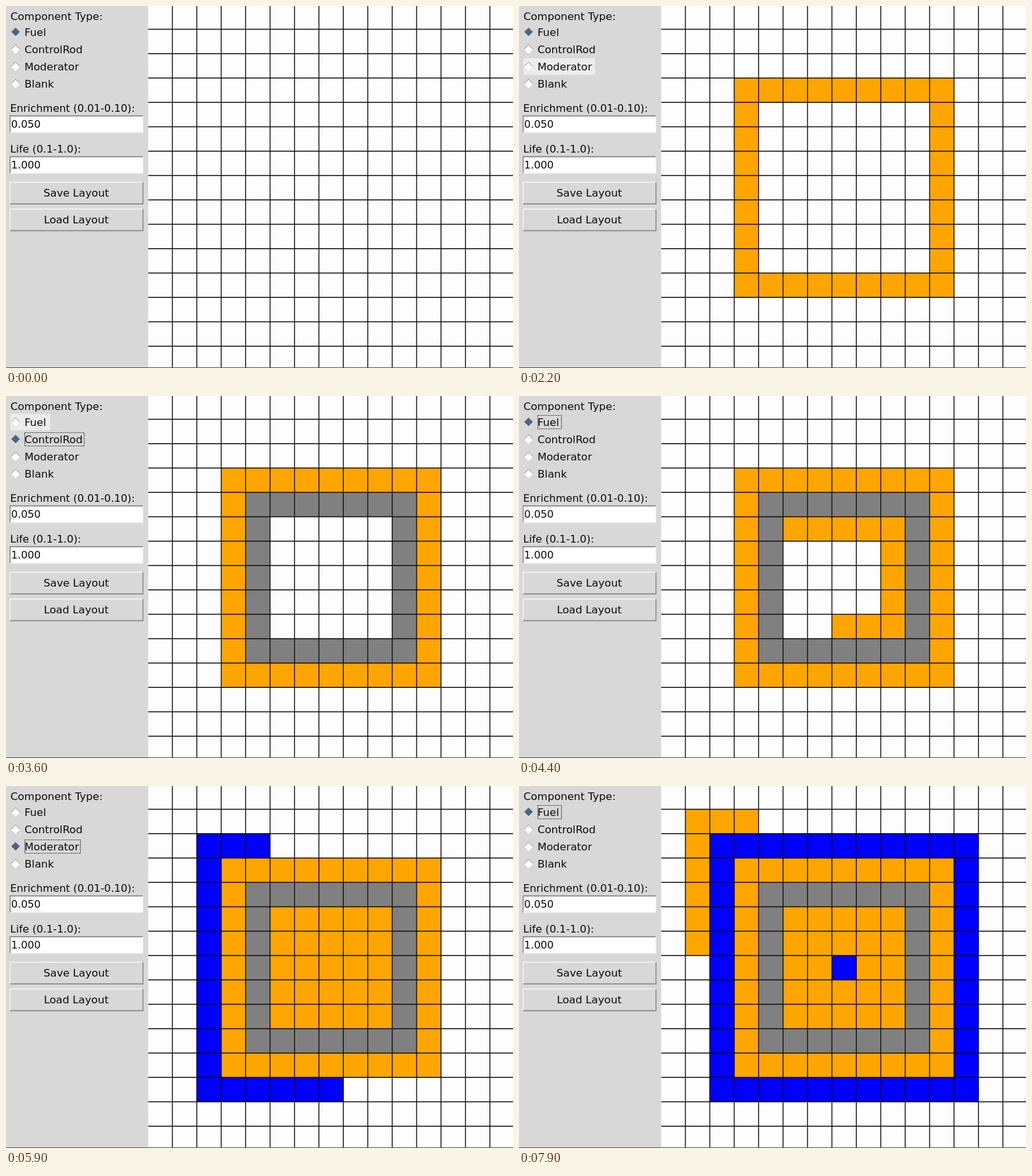
An HTML page with a canvas for the animation above (8 s loop, 794 px wide and 568 px high).

```html
<!DOCTYPE html>
<html lang="en">
<head>
<meta charset="utf-8">
<title>Layout editor</title>
<style>
  html, body { margin: 0; width: 100%; height: 100%; overflow: hidden; background: #fdfdfd; }
  canvas { display: block; }
</style>
</head>
<body>
<canvas id="stage" width="794" height="568"></canvas>
<script>
const ctx = document.getElementById('stage').getContext('2d');
const LOOP = 8000, STEP = 100;
const CELL = 38.25, LEFT = 222.3, TOP = -1.8, PANEL = 222.5;
const ORANGE = '#ffa500', GRAY = '#808080', BLUE = '#0000ff';

// Clockwise square of cells from its top left corner.
function ring(lo, hi) {
  const side = hi - lo, cells = [];
  for (let i = 0; i < side; i++) cells.push([lo + i, lo]);
  for (let i = 0; i < side; i++) cells.push([hi, lo + i]);
  for (let i = 0; i < side; i++) cells.push([hi - i, hi]);
  for (let i = 0; i < side; i++) cells.push([lo, hi - i]);
  return cells;
}

// The same square anticlockwise, from the third cell of its top row.
function reverseRing(lo, hi) {
  const cells = ring(lo, hi);
  return [...cells.slice(0, 3).reverse(), ...cells.slice(3).reverse()];
}

const moderatorRing = reverseRing(2, 12);
const strokes = [
  { color: ORANGE, start: 700, end: 1800, cells: ring(3, 11) },
  { color: GRAY, start: 2700, end: 3300, cells: ring(4, 10) },
  { color: ORANGE, start: 4000, end: 4900, cells: [...ring(5, 9), ...ring(6, 8), [7, 7]] },
  { color: BLUE, start: 5400, end: 6000, cells: moderatorRing.slice(0, 22) },
  { color: BLUE, start: 6100, end: 6700, cells: moderatorRing.slice(22) },
  { color: BLUE, start: 7000, end: 7100, cells: [[7, 7]] },
  { color: ORANGE, start: 7700, end: 7900, cells: reverseRing(1, 13).slice(0, 8) }
];

const radios = [
  { label: 'Fuel', y: 41, right: 67 },
  { label: 'ControlRod', y: 68, right: 123 },
  { label: 'Moderator', y: 95, right: 117 },
  { label: 'Blank', y: 122, right: 78 }
];
const selections = [[0, 0], [2500, 1], [3700, 0], [5200, 2], [7500, 0]];
const hovers = [[2100, 2300, 2], [2300, 2600, 1], [3500, 3800, 0], [5100, 5300, 2], [7400, 7600, 0]];

function rect(x, y, w, h, color) {
  ctx.fillStyle = color;
  ctx.fillRect(x, y, w, h);
}

function line(points, color, width = 1) {
  ctx.strokeStyle = color;
  ctx.lineWidth = width;
  ctx.beginPath();
  points.forEach(([x, y]) => ctx.lineTo(x, y));
  ctx.stroke();
}

function text(label, x, baseline, size = 16.5, align = 'left') {
  ctx.font = `${size}px "DejaVu Sans", sans-serif`;
  ctx.textAlign = align;
  ctx.fillStyle = '#0a0a0a';
  ctx.fillText(label, x, baseline);
}

function bevel(x, y, w, h, light, dark) {
  const r = x + w, b = y + h;
  line([[x, b], [x, y], [r, y]], light, 1.3);
  line([[r, y], [r, b], [x, b]], dark, 1.3);
}

function entry(value, y) {
  rect(6, y, 209, 27, '#fff');
  bevel(6.5, y + 0.5, 208, 26, '#777', '#ededed');
  text(value, 8, y + 19, 16.2);
}

function button(label, y) {
  bevel(6.5, y + 0.5, 208, 34, '#f6f6f6', '#7c7c7c');
  text(label, 110, y + 22.5, 16.6, 'center');
}

function radio({ label, y, right }, selected, focused, hovered) {
  if (hovered) rect(7, y - 13, right - 5, 26, '#ececec');
  ctx.beginPath();
  [[8, y], [15, y - 7], [22, y], [15, y + 7]].forEach(([px, py]) => ctx.lineTo(px, py));
  ctx.closePath();
  ctx.fillStyle = selected ? '#4a6689' : '#fff';
  ctx.fill();
  line([[8, y], [15, y - 7], [22, y]], '#8c8c8c');
  line([[8, y], [15, y + 7], [22, y]], '#eeeeee');
  text(label, 29, y + 6);
  if (focused) {
    ctx.setLineDash([1.3, 1.3]);
    ctx.lineWidth = 1.2;
    ctx.strokeStyle = '#111';
    ctx.strokeRect(29.5, y - 10.5, right - 30, 21);
    ctx.setLineDash([]);
  }
}

function drawPanel(t) {
  rect(0, 0, PANEL, 568, '#d8d8d8');
  text('Component Type:', 7, 21.5);
  const [since, selected] = selections.filter(([at]) => t >= at).pop();
  const hover = hovers.find(([from, to]) => t >= from && t < to);
  radios.forEach((item, i) =>
    radio(item, i === selected, i === selected && since > 0, hover && hover[2] === i));
  text('Enrichment (0.01-0.10):', 6.5, 165.5, 16.3);
  entry('0.050', 172);
  text('Life (0.1-1.0):', 6.5, 229.5, 16.4);
  entry('1.000', 236);
  button('Save Layout', 276);
  button('Load Layout', 318);
}

function drawGrid(t) {
  rect(PANEL, 0, 794 - PANEL, 568, '#fdfdfd');
  for (const { color, start, end, cells } of strokes) {
    if (t < start) continue;
    const progress = Math.min(1, (t - start) / (end - start));
    const count = 1 + Math.floor(progress * (cells.length - 1));
    for (const [col, row] of cells.slice(0, count))
      rect(LEFT + col * CELL, TOP + row * CELL, CELL, CELL, color);
  }
  for (let i = 1; i < 15; i++) {
    const x = LEFT + i * CELL, y = TOP + i * CELL;
    line([[x, 0], [x, 568]], '#0c0c0c', 1.4);
    line([[PANEL, y], [794, y]], '#0c0c0c', 1.4);
  }
}

function frame() {
  const t = Math.floor(performance.now() % LOOP / STEP) * STEP;
  drawGrid(t);
  drawPanel(t);
  line([[0, 567.5], [794, 567.5]], '#505050');
  requestAnimationFrame(frame);
}
frame();
</script>
</body>
</html>
```
